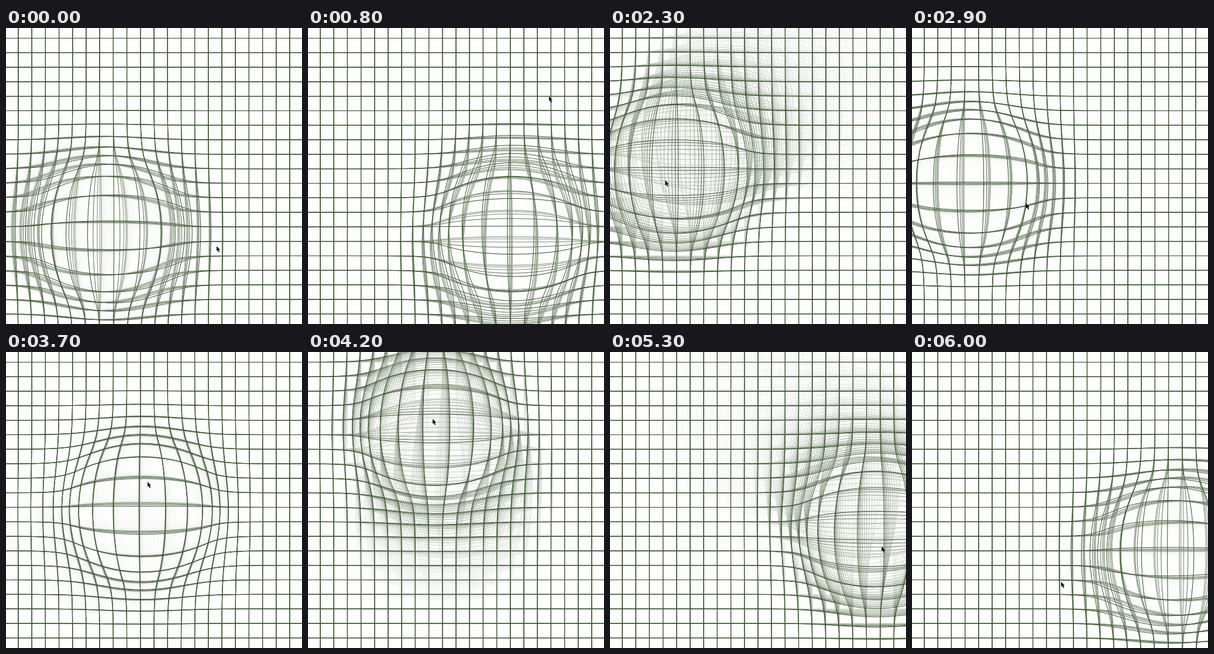
An HTML page with a canvas that plays this animation: 506 px wide and 506 px high, repeating every 6.1 s.

```html
<!DOCTYPE html>
<html>
<head>
<meta charset="utf-8">
<title>Bulging grid</title>
<style>
  html, body { margin: 0; width: 100%; height: 100%; overflow: hidden; background: #fefefc; }
  canvas { display: block; }
</style>
</head>
<body>
<canvas id="stage" width="506" height="506"></canvas>
<script>
const SIZE = 506, LOOP = 6.1, STEP = 0.1;
const LAG = 0.2;                          // the bulge trails the pointer
const DASH = 0.4;                         // duration of a quick pointer move
const GHOSTS = 20, GHOST_GAP = 1 / 30, FADE = 0.15;
const ctx = document.getElementById('stage').getContext('2d');

// The pointer glides to each `from`, then dashes to `to`, arriving at `time`
const moves = [
  { time: -1.1, from: [20, 290], to: [20, 290] },
  { time: 0, from: [157, 347], to: [360, 373] },
  { time: 0.8, from: [342, 373], to: [412, 117] },
  { time: 1.7, from: [435, 122], to: [243, 105] },
  { time: 2.9, from: [92, 263], to: [195, 300] },
  { time: 3.7, from: [231, 274], to: [242, 222] },
  { time: 4.7, from: [213, 114], to: [397, 165] },
  { time: 6, from: [467, 339], to: [255, 393] }
];

const mix = (a, b, u) => a.map((v, axis) => v + (b[axis] - v) * u);
const easeIn = u => u ** 3;
const easeOut = u => 1 - (1 - u) ** 3;

function pointerAt(t) {
  const found = moves.findIndex(move => t <= move.time);
  const i = found < 0 ? moves.length - 1 : found;
  const { time, from, to } = moves[i];
  if (i === 0) return to;
  const dashStart = time - DASH;
  if (t > dashStart) return mix(from, to, easeIn(Math.min(1, (t - dashStart) / DASH)));
  const last = moves[i - 1];
  return mix(last.to, from, easeOut((t - last.time) / (dashStart - last.time)));
}

function drawGrid([cx, cy], strength) {
  const tone = range => Math.round(254 - range * strength);
  ctx.strokeStyle = `rgb(${tone(204)}, ${tone(178)}, ${tone(214)})`;
  ctx.beginPath();
  const addPoint = (x, y, first) => {
    const dx = x - cx, dy = y - cy;
    const push = Math.exp(-(dx * dx + dy * dy) / 7500);
    ctx[first ? 'moveTo' : 'lineTo'](x + dx * push, y + dy * push);
  };
  for (let x = 21; x < SIZE; x += 23.2)
    for (let y = 0; y <= SIZE; y += 11) addPoint(x, y, y === 0);
  for (let y = 17.5; y < SIZE; y += 24.8)
    for (let x = 0; x <= SIZE; x += 11) addPoint(x, y, x === 0);
  ctx.stroke();
}

function drawPointer([x, y]) {
  ctx.fillStyle = '#000';
  ctx.fill(new Path2D(
    `M${x} ${y}v8.5l1.9-1.7 1.7 3.6 1.5-.7-1.6-3.5h2.6z`));
}

function draw(t) {
  ctx.fillStyle = '#fefefc';
  ctx.fillRect(0, 0, SIZE, SIZE);
  for (let k = GHOSTS; k >= 0; k--) {
    const age = k * GHOST_GAP;
    drawGrid(pointerAt(t - LAG - age), Math.exp(-age / FADE));
  }
  drawPointer(pointerAt(t));
}

let shown = -1;
const start = performance.now();
function tick() {
  const t = (performance.now() - start) / 1000 % LOOP;
  const step = Math.floor(t / STEP);
  if (step !== shown) draw((shown = step) * STEP);
  requestAnimationFrame(tick);
}
tick();
</script>
</body>
</html>
```
